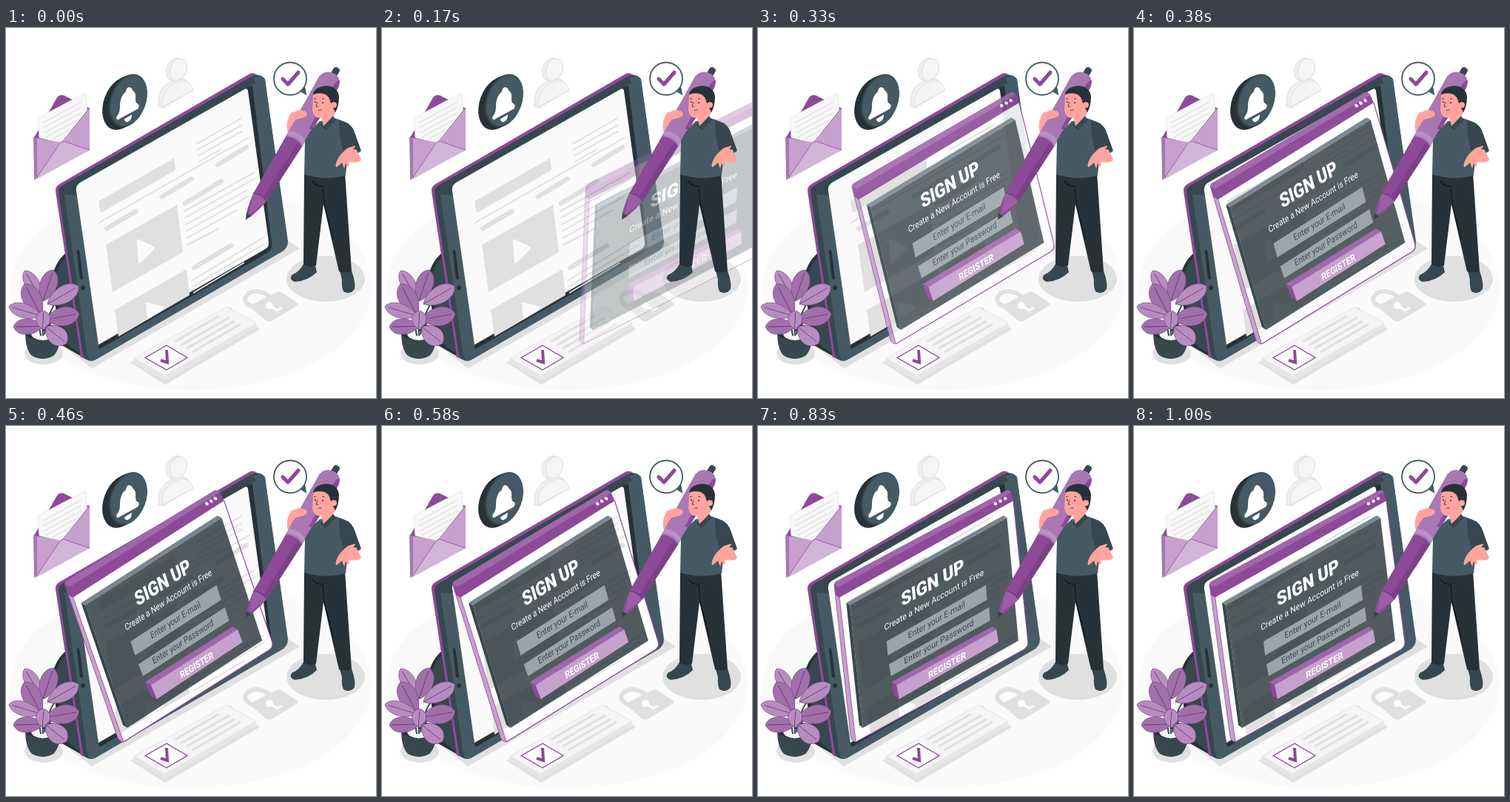
Animation, 500 px wide and 500 px high, one loop 1040 ms. Source, as an HTML page:

```html
<!DOCTYPE html>
<html lang="en">
<head>
<meta charset="utf-8">
<title>Sign up</title>
<style>
html, body { margin: 0; width: 100%; height: 100%; overflow: hidden; background: #fff; }
svg { display: block; width: 100vw; height: 100vh; }
text { font-family: Roboto, Inter, sans-serif; font-size: 11.7px; text-anchor: middle; fill: #fff; }
.purple { fill: #8c4a97; }
.lilac { fill: #c6a1cd; }
.slate { fill: #455a64; }
.dark { fill: #37474f; }
.ink { fill: #263238; }
.grey { fill: #e0e0e0; }
.pale { fill: #fafafa; }
.skin { fill: #ffa39f; }
.line { fill: none; stroke: #e0e0e0; stroke-width: 2; }
.pill { fill: none; stroke: #e0e0e0; stroke-width: 6.5; stroke-linecap: round; }
.check { fill: none; stroke: #8c4a97; stroke-width: 5; stroke-linecap: round; stroke-linejoin: round; }
</style>
</head>
<body>
<svg viewBox="0 0 500 500">
  <ellipse class="pale" cx="250" cy="350" rx="244" ry="140"/>
  <ellipse class="grey" cx="432" cy="339" rx="53" ry="31"/>

  <!-- envelope -->
  <path class="purple" d="M38 148L69 94Q73 89 78 91L112 108L112 150L40 190Z"/>
  <path d="M43 124Q43 121 46 120L105 89Q108 88 108 91L110 120L76 156L45 148Z" fill="#f7f7f7" stroke="#e8e8e8"/>
  <path class="line" style="stroke-width:1.2" d="M50 128L102 100M50 135L102 107M51 142L103 114M53 148L99 123M63 150L94 133"/>
  <path class="lilac" d="M38 148L76 155L113 107V165L38 205Z"/>
  <path d="M41 203L72 157Q76 151 81 154L113 165L42 204Z" fill="#d1b6d7"/>
  <path d="M41 203L72 157Q76 151 81 154L113 165M76 154L113 108" fill="none" stroke="#8c4a97" stroke-width=".8"/>
  <path d="M37 147L42 149V203L38 205Z" fill="#a877b2"/>

  <!-- bell -->
  <g id="disc"></g>
  <path d="M166 80Q170 80 171 84Q176 87 175 96Q175 102 179 103Q181 107 177 110L151 124Q148 123 150 119Q154 115 154 106Q154 92 162 86Q163 80 166 80ZM160 123L170 117Q170 125 164 127Q160 127 160 123Z" fill="#fff"/>

  <!-- user -->
  <g fill="#f0f0f0" stroke="#dedede" stroke-width="1">
    <path d="M206 106Q204 82 222 73Q244 61 251 82L253 84L212 108Z"/>
    <path d="M211 107Q209 87 226 76Q247 64 253 84Z" fill="#f5f5f5"/>
    <ellipse cx="229" cy="56" rx="12" ry="16" transform="rotate(22 229 56)"/>
    <ellipse cx="233" cy="56" rx="11" ry="15" transform="rotate(22 233 56)" fill="#f5f5f5"/>
  </g>

  <!-- tablet -->
  <path class="grey" d="M72 425L116 460L397 298L376 284Z"/>
  <path class="ink" d="M82 303Q64 318 62 342L74 428L104 445Z"/>
  <path class="dark" d="M80 310Q68 322 67 340L80 425L100 440Z"/>
  <path class="purple" d="M67 221Q66 215 72 211L329 62Q335 59 340 64L345 80L110 448L101 445Z"/>
  <path class="dark" d="M71 223Q70 216 76 213L331 66Q342 60 350 69L380 290L116 450Q107 450 104 443Z"/>
  <path class="slate" d="M79 225Q78 217 84 213L334 68Q346 61 350 70L381 288Q381 296 375 301L120 449Q112 452 110 443Z"/>
  <path class="dark" d="M79 225Q78 217 84 213L334 68L338 74L97 211Q92 216 96 226Z"/>
  <path class="ink" d="M326 80L333 78L359 291Q360 299 353 304L126 434L125 428Z"/>
  <path class="pale" d="M95 220Q94 213 100 209L322 83Q326 80 327 85L355 289Q356 296 350 299L125 428Z"/>
  <path d="M97.500 302L102 338" stroke="#263238" stroke-width="4" stroke-linecap="round"/>
  <circle class="ink" cx="104" cy="351" r="3"/>

  <!-- consent card -->
  <path class="grey" d="M168 452L302 377L343 407L215 482Z"/>
  <path d="M173 446L213 470L338 398V405L215 477L173 453Z" fill="#e6e6e6"/>
  <path d="M173 446L298 377L338 399L214 470Z" fill="#f5f5f5" stroke="#e6e6e6"/>
  <path class="line" style="stroke-width:3" d="M228 424L288 389M236 429L302 391M244 433L309 396M252 438L317 400"/>
  <path d="M188 445.500L217 429L245 445.500L217 462Z" fill="#fff" stroke="#8c4a97" stroke-width="1.300"/>
  <path class="check" style="stroke-width:4;stroke-linecap:butt;stroke-linejoin:miter" d="M209 449L218 452L217 435"/>

  <!-- lock -->
  <path d="M337 378Q323 374 323 365Q327 355 340 356Q353 358 359 366" fill="none" stroke="#e0e0e0" stroke-width="6"/>
  <path class="grey" d="M331 378Q329 376 332 374L366 357Q370 355 374 358L393 371Q396 373 392 376L359 396Q355 398 351 395Z"/>
  <circle class="pale" cx="356" cy="375" r="5"/>
  <path d="M357 376L366 381L373 378" stroke="#fafafa" stroke-width="3.500" fill="none"/>

  <!-- plant -->
  <ellipse class="grey" cx="51" cy="440" rx="26" ry="15"/>
  <path class="dark" d="M26 411Q26 434 35 443Q50 451 64 443Q73 435 74 411Z"/>
  <ellipse class="ink" cx="50" cy="411" rx="24" ry="11"/>
  <ellipse cx="50" cy="413" rx="16" ry="9" fill="#f5f5f5"/>
  <path d="M50 416Q50 390 47 365M47 416Q44 395 38 385M52 414Q57 385 66 373M50 410L61 398" fill="none" stroke="#37474f" stroke-width="2"/>
  <g id="leaves"></g>

  <!-- window sheet, under the page drawings -->
  <path class="win" opacity="0" d="M103 216L341 101L366 291Q367 298 361 302L137 427Z" fill="#fff"/>

  <!-- page -->
  <path class="grey" d="M125 234L227 176L229 192L128 250ZM135 293L231 239L239 303L144 357ZM147 381L244 326L248 361L152 417Z"/>
  <path class="pale" d="M177 288Q177 284 181 286L199 295Q202 297 199 300L182 317Q179 320 179 316ZM189 373Q189 369 192 371L212 376Q215 378 211 381L191 394Z"/>
  <path class="line" d="M124 264L330 147M257 157L318 122M258 165L319 131M259 173L320 139M260 181L290 164M240 248L336 195M241 257L337 203M242 266L326 219M243 275L328 227M244 284L312 246M245 293L288 271M250 342L348 283M251 350L349 292M253 358L322 317"/>
  <path class="pill" d="M136 271L175 248M211 228L250 204M286 185L325 161M242 237L291 207M254 324L304 294"/>

  <!-- sign-up window -->
  <g class="win" opacity="0">
    <path d="M341 101L366 291Q367 298 361 302L137 427" fill="none" stroke="#8c4a97" stroke-width="1.300"/>
    <path class="lilac" d="M102 214L108 220L137 427Q131 426 130 420Z" stroke="#8c4a97" stroke-width=".8"/>
    <path d="M102 213Q103 210 106 209L331 87Q335 85 338 90L108 219Z" fill="#a066aa"/>
    <path class="purple" d="M107 218L338 90L341 101L109 232Z"/>
    <path class="purple" d="M102 213L108 218L109 232L104 228Z"/>
    <g fill="#fff"><circle cx="317" cy="105" r="2.300"/><circle cx="323.500" cy="101.500" r="2.300"/><circle cx="330" cy="98" r="2.300"/></g>
    <path class="ink" opacity=".8" d="M124 242L333 124L353 290L146 408Z"/>
    <path class="dark" d="M119 239L124 242L146 408L141 404Z"/>
    <path d="M119 239L328 121L333 124L124 242Z" fill="#78868d"/>
    <path d="M175 291L307 215L309 235L177 310ZM179 322L312 245L314 263L182 338Z" fill="#9aa5aa"/>
    <path d="M183 346L317 271L323 275L190 350Z" fill="#a066aa"/>
    <path class="purple" d="M183 346L190 350L194 369L187 365Z"/>
    <path class="lilac" d="M190 350L323 275L326 292L194 369Z"/>
    <g id="labels"></g>
  </g>

  <!-- speech bubble -->
  <path d="M398 85L405 89L403 79Z" fill="#455a64" stroke="#455a64" stroke-width="2"/>
  <circle cx="384" cy="68.500" r="22" fill="#fff" stroke="#455a64" stroke-width="1.800"/>
  <path class="check" d="M374 69L381 76L395 60"/>

  <!-- gripping arm, then the pen along its axis -->
  <path class="skin" d="M405 150Q383 147 380 138Q378 124 386 114L400 112L396 140Z"/>
  <g transform="translate(324 259) rotate(-58.4)">
    <path class="dark" d="M0 0L8 -4L11 3L8 4Z"/>
    <path class="purple" d="M8 -4Q26 -9 37 -10L128 -13V13L37 11Q22 9 8 4Z"/>
    <path d="M8 0L33 -9H38Q41 0 38 10H33Z" fill="#9c5fa7"/>
    <path d="M36 -10Q41 0 36 11" fill="none" stroke="#703b79" stroke-width="1.500"/>
    <path d="M39 4L126 5V13L38 11Z" fill="#7c4186"/>
    <rect class="dark" x="225" y="-6" width="15" height="9" rx="4"/>
    <path d="M124 -13Q131 0 124 13H218Q230 11 231 -1Q230 -15 217 -17Z" fill="#a878b3"/>
    <path d="M126 -13Q133 0 126 13L133 13Q140 0 133 -13Z" fill="#b991c2"/>
    <path d="M150 8L214 6Q224 6 227 9Q222 13 214 13H150Z" fill="#8c4a97"/>
  </g>

  <!-- man -->
  <path class="dark" d="M402 319L418 321L420 330Q408 342 390 343Q382 340 386 334Q397 329 402 319ZM451 328L467 328Q473 345 471 353Q465 361 456 356Q453 349 454 340Z"/>
  <path class="ink" d="M403 195H458L462 255L467 329Q458 332 450 329L429 238L419 321Q410 325 402 320Z"/>
  <path d="M414 207Q419 214 428 214L430 238L443 288" fill="none" stroke="#111a1e" stroke-width="1.300"/>
  <path class="skin" d="M383 119Q387 113 396 111Q404 111 407 115Q407 120 402 121L391 124L385 133Z"/>
  <path class="slate" d="M404 152Q412 136 424 126L444 122Q462 126 466 137L459 199Q432 207 403 198Z"/>
  <path class="dark" d="M450 125Q464 126 470 138L480 166Q470 174 457 172L451 145Z"/>
  <path class="skin" d="M459 171Q468 161 474 165L480 178Q478 183 464 181L463 189L459 183L457 190L454 182L447 188Q444 187 447 180Q451 170 462 162L472 159Q473 162 464 167Z"/>
  <path class="skin" d="M415 91Q423 84 437 88L446 98V112L441 122L429 132L426 121Q416 123 414 111Z"/>
  <path class="dark" d="M425 128L429 133L442 119L446 124L432 138L427 134Z"/>
  <path class="ink" d="M415 90Q416 80 432 78Q449 79 450 93Q450 106 445 114L441 106L438 99Q437 92 430 89Q421 87 415 90Z"/>
  <circle class="skin" cx="443" cy="104" r="4"/>
  <path d="M416 96L419 95M427 95L430 96M421 100L419 106L422 106M422 111Q425 112 427 110" fill="none" stroke="#263238" stroke-width=".8"/>
  <circle class="ink" cx="418" cy="100" r="1"/><circle class="ink" cx="428" cy="101" r="1"/>
</svg>
<script>
const $ = id => document.getElementById(id);

const oval = (x, y, rx, ry, style) =>
  `<ellipse class="${style}" cx="${x}" cy="${y}" rx="${rx}" ry="${ry}" transform="rotate(20 ${x} ${y})"/>`;
$("disc").innerHTML =
  [0, 2, 4, 6].map(d => oval(156 + d, 102 - d / 2, 24, 37, "ink")).join("") +
  oval(165, 98, 24, 37, "dark") + oval(166, 98, 23, 35, "slate");

// base x, y, tip x, y, half width, colour
const leaf = (x, y, u, v, w, fill) => {
  const len = Math.hypot(u - x, v - y), nx = (y - v) / len * w, ny = (u - x) / len * w;
  const at = (k, s) => `${x + (u - x) * k + nx * s} ${y + (v - y) * k + ny * s}`;
  return `<path d="M${x} ${y}C${at(.25, 1.3)} ${at(.85, 1.5)} ${u} ${v}C${at(.85, -1.5)} ${at(.25, -1.3)} ${x} ${y}Z" fill="${fill}" stroke="#7a4385" stroke-width=".7"/>
    <path d="M${x} ${y}L${at(.9, 0)}" stroke="#633069" stroke-width=".8"/>`;
};
const LIGHT = "#b78dc0", MID = "#a170ab";
$("leaves").innerHTML = [
  [48, 366, 25, 328, 9, LIGHT], [50, 369, 64, 327, 11, MID], [47, 388, 25, 346, 12, MID],
  [56, 373, 98, 349, 11, LIGHT], [47, 389, 4, 376, 9, LIGHT], [50, 403, 10, 404, 10, MID],
  [54, 394, 99, 386, 12, MID], [54, 404, 82, 426, 12, LIGHT], [49, 407, 51, 382, 9, LIGHT]
].map(l => leaf(...l)).join("");

const label = (text, x, y, style = "") =>
  `<text transform="matrix(.866 -.495 .12 1 ${x} ${y})" style="${style}">${text}</text>`;
$("labels").innerHTML =
  label("SIGN UP", 236, 220, "font-size:25px;font-weight:900") +
  label("Create a New Account is Free", 238, 239) +
  label("Enter your E-mail", 242, 266, "fill:#37474f") +
  label("Enter your Password", 246, 295.5, "fill:#37474f") +
  label("REGISTER", 258, 327.5, "font-size:12.5px;font-weight:700");

// cubic-bezier(.36, -.01, .5, 1.38)
const curve = (s, a, b) => 3 * s * (1 - s) ** 2 * a + 3 * s * s * (1 - s) * b + s ** 3;
function ease(x) {
  let lo = 0, hi = 1;
  for (let i = 0; i < 24; i++) {
    const mid = (lo + hi) / 2;
    if (curve(mid, .36, .5) < x) lo = mid; else hi = mid;
  }
  return curve(lo, -.01, 1.38);
}

const LOOP = 1040, STEP = LOOP / 25;
const parts = document.querySelectorAll(".win");
function draw(now) {
  const step = Math.floor((now % LOOP + 4) / STEP) % 25;
  const p = step ? Math.min(1, step / 24 + .016) : 0;
  let shift = 0, skew, alpha = 1;
  if (p < .6) {
    const e = ease(p / .6);
    shift = 250 * (1 - e);
    skew = -20 + 30 * e;
    alpha = Math.max(0, Math.min(1, e));
  } else if (p < .8) {
    skew = 10 - 12 * ease((p - .6) / .2);
  } else {
    skew = -2 + 2 * ease((p - .8) / .2);
  }
  for (const part of parts) {
    part.setAttribute("transform", `translate(${250 + shift} 250) skewX(${skew}) translate(-250 -250)`);
    part.setAttribute("opacity", alpha);
  }
}

const start = performance.now();
function tick() {
  draw(performance.now() - start);
  requestAnimationFrame(tick);
}
tick();
</script>
</body>
</html>
```
